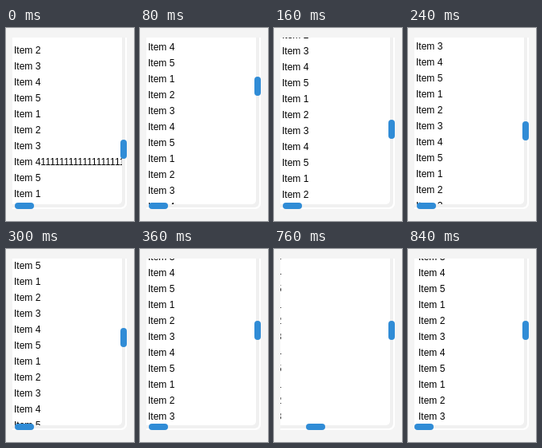
Write an HTML page with a canvas that moves like this. It is 160 px wide and 242 px high and loops after 960 ms.

```html
<!DOCTYPE html>
<html>
<head>
<meta charset="utf-8">
<style>
html, body { margin: 0; width: 100%; height: 100%; overflow: hidden; background: #f4f4f4; }
canvas { display: block; }
</style>
</head>
<body>
<canvas id="stage" width="160" height="242"></canvas>
<script>
const ctx = document.getElementById('stage').getContext('2d');
const LOOP = 960, STEP = 20;
const LEFT = 8, TOP = 12, ROW = 20, ROWS = 40, LONG_ROW = 28;
const SCROLL_RATIO = 3.24;

// [time in ms, scroll offset in px]
const verticalKeys = [[0, 414], [100, 131.5], [180, 367.5], [360, 252]];
const horizontalKeys = [[0, 3], [680, 3], [760, 37], [820, 0]];

function valueAt(keys, time) {
  for (let i = 1; i < keys.length; i++) {
    const [t0, a] = keys[i - 1], [t1, b] = keys[i];
    if (time <= t1) {
      const s = Math.max(0, (time - t0) / (t1 - t0));
      return a + (b - a) * (1 - Math.cos(Math.PI * s)) / 2;
    }
  }
  return keys[keys.length - 1][1];
}

function box(x, y, w, h, radii, color) {
  ctx.beginPath();
  ctx.roundRect(x, y, w, h, radii);
  ctx.fillStyle = color;
  ctx.fill();
}

function drawItems(scrollX, scrollY) {
  ctx.save();
  ctx.beginPath();
  ctx.rect(LEFT, TOP, 137, 209);
  ctx.clip();
  ctx.fillStyle = '#000';
  ctx.font = '12px Arial, "Liberation Sans", sans-serif';
  for (let i = 0; i < ROWS; i++) {
    const y = TOP + 14 + i * ROW - scrollY;
    if (y < 0 || y > 242) continue;
    const tail = i === LONG_ROW ? '1'.repeat(20) : '';
    ctx.fillText(`Item ${i % 5 + 1}${tail}`, 13 - scrollX, y);
  }
  ctx.restore();
}

function draw(time) {
  const scrollY = Math.round(valueAt(verticalKeys, time));
  const scrollX = Math.round(valueAt(horizontalKeys, time));
  // The horizontal thumb trails the content by one step.
  const thumbX = Math.round(valueAt(horizontalKeys, time - STEP));

  ctx.fillStyle = '#f4f4f4';
  ctx.fillRect(0, 0, 160, 242);
  box(LEFT, TOP, 143, 215, [0, 0, 7, 0], '#fff');
  box(LEFT, TOP, 141, 213, [0, 0, 6, 0], '#f0f0f0');
  box(LEFT, TOP, 137, 209, [0, 0, 5, 0], '#fff');
  drawItems(scrollX, scrollY);
  box(143, TOP + Math.round(scrollY / SCROLL_RATIO), 8, 24, 4, '#308cd6');
  box(LEFT + thumbX, 219, 24, 8, 4, '#308cd6');
}

function tick() {
  const time = performance.now() % LOOP;
  draw(Math.floor(time / STEP) * STEP);
  requestAnimationFrame(tick);
}
tick();
</script>
</body>
</html>
```
